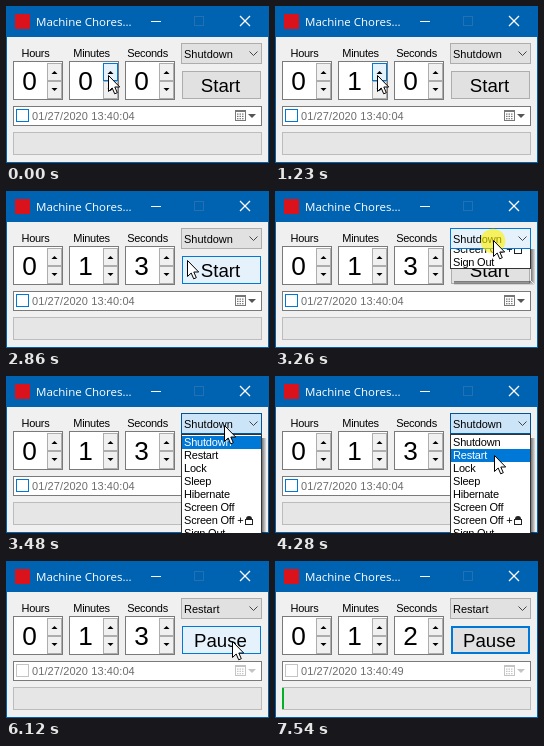
Write an HTML page with a canvas that moves like this. It is 263 by 157 pixels and loops after 8000 ms.

```html
<!DOCTYPE html>
<html lang="en">
<head>
<meta charset="utf-8">
<title>Shutdown timer</title>
<style>
html, body { margin: 0; width: 100%; height: 100%; overflow: hidden; background: #f0f0f0; }
canvas { display: block; width: 100vw; height: 100vh; }
</style>
</head>
<body>
<canvas id="stage" width="263" height="157"></canvas>
<script>
const ctx = document.getElementById('stage').getContext('2d');
const LOOP = 8000;
const SANS = '"Liberation Sans", Arial, sans-serif';
const BLUE = '#0078d7', HOVER = '#e5f1fb', PRESSED = '#cce4f7', FACE = '#e1e1e1', EDGE = '#adadad';
const CHOICES = ['Shutdown', 'Restart', 'Lock', 'Sleep', 'Hibernate', 'Screen Off', 'Screen Off +', 'Sign Out'];

const initial = {
  cursor: [102, 69], click: 0, hover: 'minutes', values: [0, 0, 0], caret: false,
  combo: [FACE, EDGE], choice: 'Shutdown', list: null, selected: 0, label: 'Start',
  running: false, focused: false, clock: '13:40:04', progress: 0
};

// Each step changes part of the state and then holds.
const steps = [
  [820, { values: [0, 1, 0], click: .6 }],
  [1020, { click: .3 }],
  [1220, { click: 0 }],
  [1440, { cursor: [115, 69], hover: '' }],
  [1640, { cursor: [144, 67] }],
  [1860, { cursor: [155, 66], hover: 'seconds' }],
  [2040, { values: [0, 1, 1], click: .6 }],
  [2260, { values: [0, 1, 2], click: 0, caret: true }],
  [2460, { values: [0, 1, 3], click: .6 }],
  [2660, { click: 0, caret: false }],
  [2860, { cursor: [181, 69], hover: 'start' }],
  [3060, { cursor: [212, 66] }],
  [3260, { cursor: [218, 49], hover: '', combo: [HOVER, BLUE], click: .62, list: -86 }],
  [3480, { click: 0, list: 0, combo: [PRESSED, '#005499'] }],
  [4080, { cursor: [219, 65] }],
  [4280, { cursor: [219, 79], selected: 1 }],
  [4480, { click: .6 }],
  [4900, { cursor: [220, 79], click: 0, list: null, choice: 'Restart', hover: 'start' }],
  [5100, { cursor: [222, 80], combo: ['#d6e2ec', '#8099ae'] }],
  [5300, { cursor: [225, 80], combo: [FACE, EDGE] }],
  [5500, { cursor: [226, 80] }],
  [5700, { click: .6, hover: 'pressed' }],
  [5920, { click: .3 }],
  [6120, { click: 0, hover: 'start', label: 'Pause', running: true }],
  [6520, { cursor: null, hover: '', focused: true }],
  [7140, { values: [0, 1, 2], clock: '13:40:49' }],
  [7540, { progress: 2 }]
];

function stateAt(time) {
  return Object.assign({}, initial, ...steps.filter(([at]) => at <= time).map(step => step[1]));
}

function rect(x, y, w, h, fill) {
  ctx.fillStyle = fill;
  ctx.fillRect(x, y, w, h);
}

function box(x, y, w, h, fill, edge, weight = 1) {
  rect(x, y, w, h, edge);
  rect(x + weight, y + weight, w - 2 * weight, h - 2 * weight, fill);
}

function text(str, x, y, size, { color = '#000', align = 'left', spacing = 0, font = SANS } = {}) {
  ctx.font = `${size}px ${font}`;
  ctx.letterSpacing = spacing + 'px';
  ctx.textAlign = align;
  ctx.fillStyle = color;
  ctx.fillText(str, x, y);
}

function path(points, { fill, stroke, width = 1, close = false }) {
  ctx.beginPath();
  points.forEach(([x, y]) => ctx.lineTo(x, y));
  if (close) ctx.closePath();
  if (fill) { ctx.fillStyle = fill; ctx.fill(); }
  if (stroke) { ctx.strokeStyle = stroke; ctx.lineWidth = width; ctx.stroke(); }
}

function triangle(x, y, halfWidth, height, fill) {
  path([[x - halfWidth, y], [x + halfWidth, y], [x, y + height]], { fill });
}

function drawWindow() {
  rect(0, 0, 263, 157, '#0063b1');
  rect(1, 31, 261, 125, '#f0f0f0');
  rect(9, 8, 15, 15, '#d9121c');
  text('Machine Chores...', 30, 20, 11.5, { color: '#fff', font: '"Open Sans", sans-serif' });
  rect(145, 15, 10, 1, '#fff');
  ctx.strokeStyle = '#2470b0';
  ctx.lineWidth = 1;
  ctx.strokeRect(188.5, 10.5, 9, 9);
  path([[234, 10], [244, 20]], { stroke: '#fff', width: 1.2 });
  path([[244, 10], [234, 20]], { stroke: '#fff', width: 1.2 });
}

function drawSpinner(x, title, value, hovered, caret) {
  text(title, x + 22.5, 50.5, 11, { align: 'center', spacing: -.3 });
  box(x, 55, 50, 39, '#fff', '#7a7a7a');
  text(value, x + 16.5, 83.7, 26.2, { align: 'center' });
  if (caret) rect(x + 9, 59, 1, 30, '#000');
  box(x + 34, 57, 15, 18, hovered ? HOVER : '#f0f0f0', hovered ? BLUE : EDGE);
  box(x + 34, 75, 15, 18, '#f0f0f0', EDGE);
  triangle(x + 41.5, 68, 3, -3, '#000');
  triangle(x + 41.5, 82, 3, 3, '#000');
}

function drawCombo(s) {
  box(175, 37, 81, 21, ...s.combo);
  text(s.choice, 178, 52, 11);
  path([[243.5, 45.5], [247.5, 49.5], [251.5, 45.5]], { stroke: '#444' });
}

function drawButton(s) {
  const pressed = s.hover === 'pressed', active = pressed || s.hover === 'start';
  const fill = pressed ? PRESSED : active ? HOVER : FACE;
  box(176, 65, 79, 28, fill, active || s.focused ? BLUE : EDGE, s.focused ? 2 : 1);
  text(s.label, 214.5, 86.3, 18.67, { align: 'center' });
}

function drawDate(s) {
  box(7, 100, 249, 20, '#fff', '#7a7a7a');
  box(10, 103, 13, 13, '#fff', s.running ? '#c4c4c4' : BLUE);
  text('01/27/2020 ' + s.clock, 26, 114, 11, { color: '#6d6d6d', spacing: .1 });
  const ink = s.running ? '#c4c4c4' : '#777';
  box(229, 104, 11, 11, '#fff', ink);
  rect(229, 104, 11, 2, ink);
  for (let row = 0; row < 3; row++)
    for (let col = 0; col < 3; col++) rect(231 + col * 2.5, 107.5 + row * 2.3, 1.5, 1.2, ink);
  triangle(246, 108, 4, 4, s.running ? '#c4c4c4' : '#555');
}

function drawProgress(s) {
  box(7, 126, 249, 23, '#e6e6e6', '#bcbcbc');
  rect(7, 127, s.progress, 21, '#06b025');
}

function drawLock(x, y) {
  ctx.beginPath();
  ctx.arc(x + 4, y, 3, Math.PI, 0);
  ctx.fillStyle = '#222';
  ctx.fill();
  box(x, y, 8, 6, '#fff', '#222');
}

// The drop-down slides out from beneath the combo box, its shadow a row ahead.
function drawList(offset, selected) {
  ctx.save();
  ctx.beginPath();
  ctx.rect(175, 58, 88, 99);
  ctx.clip();
  const top = 58 + offset, height = 106;
  const shadowEnd = top + height + (offset < 0 ? 12 : 0);
  for (let i = 0; i < 4; i++) {
    const shade = `rgba(0,0,0,${.45 - i * .11})`;
    rect(256 + i, top + 4, 1, shadowEnd - top - 4 + i, shade);
    rect(179, shadowEnd + i, 77 + i, 1, shade);
  }
  box(175, top, 81, height, '#fff', '#333');
  CHOICES.forEach((name, i) => {
    const y = top + 2 + i * 13;
    if (i === selected) rect(176, y, 79, 13, BLUE);
    text(name, 178, y + 10, 11, { color: i === selected ? '#fff' : '#000', spacing: -.2 });
  });
  drawLock(239, top + 85);
  ctx.restore();
}

function drawCursor([x, y], click) {
  if (click) {
    ctx.beginPath();
    ctx.arc(x, y + 1, 12.3, 0, 2 * Math.PI);
    ctx.fillStyle = `rgba(255,240,0,${click})`;
    ctx.fill();
  }
  const arrow = [[0, 0], [0, 16], [3.7, 12.5], [6.2, 18.3], [8.8, 17.2], [6.3, 11.5], [11.2, 11.5]];
  path(arrow.map(([dx, dy]) => [x + dx + .5, y + dy + .5]), { fill: '#fff', stroke: '#000', close: true });
}

function draw(time) {
  const s = stateAt(time);
  drawWindow();
  ['Hours', 'Minutes', 'Seconds'].forEach((title, i) =>
    drawSpinner(7 + i * 56, title, s.values[i], s.hover === title.toLowerCase(), i === 2 && s.caret));
  drawCombo(s);
  drawButton(s);
  drawDate(s);
  drawProgress(s);
  if (s.list !== null) drawList(s.list, s.selected);
  if (s.cursor) drawCursor(s.cursor, s.click);
}

const start = performance.now();
function tick() {
  draw((performance.now() - start) % LOOP);
  requestAnimationFrame(tick);
}
tick();
</script>
</body>
</html>
```
